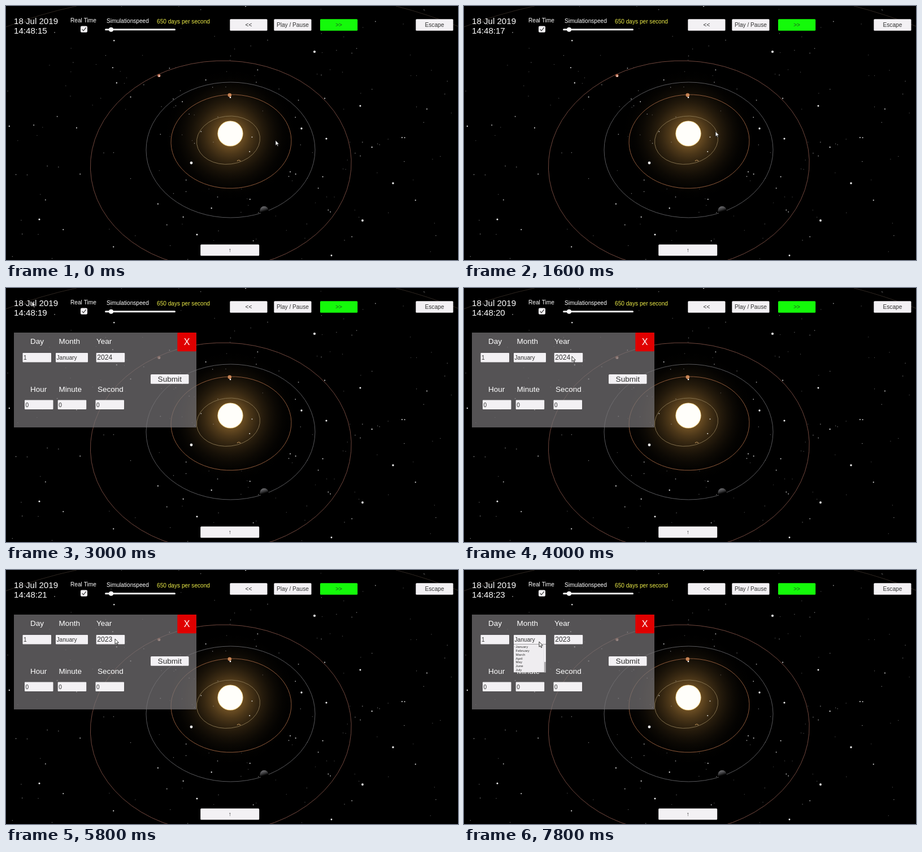
An HTML page with a canvas for the animation above (8000 ms loop, 800x450 px).

```html
<!DOCTYPE html>
<html lang="en">
<head>
<meta charset="utf-8">
<title>Solar system simulation</title>
<style>
  html, body { margin: 0; width: 100%; height: 100%; overflow: hidden; background: #000; }
  canvas { display: block; width: 100vw; height: 100vh; }
</style>
</head>
<body>
<canvas id="stage" width="800" height="450"></canvas>
<script>
const ctx = document.getElementById('stage').getContext('2d');
const LOOP = 8000, STEP = 200, TAU = Math.PI * 2;
const LIGHT = '#f3f1f4', DARK = '#323232';

const PANEL_OPENS = 3000, YEAR_CHANGES = 5000, MONTHS_OPEN = 7600;
const POINTER_START = { x: 477, y: 238 };
const POINTER_MOVES = [
  { from: 1400, to: 2600, x: 46, y: 24 },
  { from: 3000, to: 3800, x: 191, y: 121 },
  { from: 5000, to: 5400, x: 193, y: 122 },
  { from: 6200, to: 7200, x: 133, y: 127 }
];
const BRIGHT_STARS = [
  [328, 278], [546, 81], [631, 380], [685, 314], [523, 217],
  [567, 235], [59, 378], [338, 405], [627, 177], [576, 442]
];

function disc(x, y, r, fill) {
  ctx.fillStyle = fill;
  ctx.beginPath();
  ctx.arc(x, y, r, 0, TAU);
  ctx.fill();
}

function box(x, y, w, h, fill = LIGHT, radius = 1) {
  ctx.fillStyle = fill;
  ctx.beginPath();
  ctx.roundRect(x, y, w, h, radius);
  ctx.fill();
}

function text(value, x, y, size = 10.15, fill = '#fff', align = 'left') {
  ctx.font = `${size}px "Liberation Sans", Arial, sans-serif`;
  ctx.textAlign = align;
  ctx.fillStyle = fill;
  ctx.fillText(value, x, y);
}

function button(label, x, y, w, h, fill = LIGHT, color = DARK, size = 10.15) {
  box(x, y, w, h, fill, 1.5);
  text(label, x + w / 2, y + h / 2 + size * 0.35, size, color, 'center');
}

function field(value, x, y, w, size = 10.15) {
  box(x, y, w, 16.5);
  text(value, x + 1.5, y + 12.3, size, DARK);
}

function stroke(path, color, width) {
  ctx.strokeStyle = color;
  ctx.lineWidth = width;
  ctx.stroke(new Path2D(path));
}

function orbit(x, y, rx, ry, tilt, color) {
  ctx.strokeStyle = color;
  ctx.lineWidth = 0.9;
  ctx.beginPath();
  ctx.ellipse(x, y, rx, ry, tilt, 0, TAU);
  ctx.stroke();
}

function drawStars() {
  let seed = 71;
  const random = () => (seed = (seed * 16807) % 2147483647) / 2147483647;
  for (let i = 0; i < 200; i++) {
    const size = random() ** 3;
    disc(random() * 800, random() * 450, 0.6 + size * 0.6, `rgba(255,255,255,${0.35 + size * 0.55})`);
  }
  BRIGHT_STARS.forEach(([x, y], i) => disc(x, y, 1.4 + Math.exp(-i / 3), '#f0f0f0'));
}

function drawGlow() {
  const glow = ctx.createRadialGradient(397, 228, 0, 397, 228, 116);
  for (let s = 0; s <= 10; s++) {
    glow.addColorStop(s / 10, `rgba(166,120,54,${(1 - s / 10) ** 2.2})`);
  }
  disc(397, 228, 116, glow);
}

function drawPlanets() {
  stroke('M409 275Q412 271 415 275', '#b28b56', 1.2);
  disc(395.8, 157.7, 3.3, '#c98454');
  disc(397, 162, 1.3, '#fff');

  const shade = ctx.createLinearGradient(455, 354, 459, 367);
  shade.addColorStop(0, '#77777a');
  shade.addColorStop(0.45, '#3c3c3e');
  shade.addColorStop(0.75, '#000');
  disc(457, 362.5, 7.7, shade);

  disc(270.8, 123.2, 2.7, '#b9694e');
  disc(271.3, 124.2, 1.4, '#f0d9ce');
}

function drawSpace() {
  ctx.fillStyle = '#000';
  ctx.fillRect(0, 0, 800, 450);
  drawGlow();
  drawStars();

  orbit(393.5, 237.7, 56.2, 42.5, -0.12, '#8a7652');
  orbit(398.5, 240, 106.5, 83, -0.03, '#9c6240');
  orbit(397.5, 255, 149.5, 120, 0, '#626266');
  orbit(380.3, 281, 231, 184, -0.04, '#7d5044');
  stroke('M0 37Q60 14 125 0M690 0Q748 15 800 36', '#3a3029', 0.8);

  disc(397, 226, 22.6, '#ffdf94');
  disc(397, 226, 21.7, '#fffefa');
  drawPlanets();
}

function drawToolbar(t) {
  const seconds = t < STEP ? 15 : 16 + Math.floor(t / 1000);
  text('18 Jul 2019', 14, 32, 15.1);
  text('14:48:' + seconds, 14, 49.3, 15.1);

  text('Real Time', 114, 29);
  box(132, 35.5, 12, 11.2, LIGHT, 2);
  stroke('M134.5 41L137 43.8 141.8 38.2', DARK, 1.1);

  text('Simulationspeed', 178, 30);
  text('650 days per second', 267, 30.5, 10.15, '#eded48');
  box(175, 40.2, 125, 3, '#e8e8e8', 1.5);
  disc(186, 41.7, 4, '#fff');

  button('<<', 396.3, 23.3, 66.2, 20.4);
  button('Play / Pause', 474.3, 23.3, 66.2, 20.4);
  button('>>', 556, 23.3, 66.2, 20.4, '#14fa0a', '#205c20');
  button('Escape', 725.3, 23.3, 66.2, 20.4);
  button('↑', 344.2, 422.5, 104, 20);
}

function drawPanel(t) {
  box(14, 79, 323, 168, 'rgba(118,115,118,.72)', 0);
  button('X', 303.3, 79, 33.5, 33.3, '#e00000', '#fff', 16);

  text('Day', 43, 98.5, 13.5);
  text('Month', 93.5, 98.5, 13.5);
  text('Year', 160, 98.5, 13.5);
  field('1', 29.5, 115, 50.5);
  field('January', 88, 115, 57);
  field(t < YEAR_CHANGES ? '2024' : '2023', 159.7, 115, 50.5, 12.1);

  button('Submit', 256, 153, 67.5, 16.7, LIGHT, DARK, 13.6);

  text('Hour', 43, 184.3, 13.5);
  text('Minute', 93.5, 184.3, 13.5);
  text('Second', 162, 184.3, 13.5);
  for (const x of [33, 91.7, 158.5]) field('0', x, 198.5, 50.5);

  if (t >= MONTHS_OPEN) drawMonths();
}

function drawMonths() {
  box(88, 132, 57, 49.3, '#efedf0', 0);
  ['January', 'February', 'March', 'April', 'May', 'June', 'July']
    .forEach((month, i) => text(month, 91.5, 138.4 + i * 6.72, 6.1, DARK));
  stroke('M89 136H90.5', '#777', 0.7);
  box(141.8, 132, 3.2, 49.3, '#aaa8ab', 0);
  box(142, 132, 2.8, 31, '#f5f3f6', 1);
}

function drawPointer(t) {
  let { x, y } = POINTER_START;
  for (const move of POINTER_MOVES) {
    const part = Math.min(1, Math.max(0, (t - move.from) / (move.to - move.from)));
    const eased = part * part * (3 - 2 * part);
    x += (move.x - x) * eased;
    y += (move.y - y) * eased;
  }
  ctx.save();
  ctx.translate(x, y);
  const arrow = 'M0 0V9.2L2.1 7.3 3.6 10.6 5 10 3.6 6.8H6.4Z';
  ctx.fillStyle = '#fff';
  ctx.fill(new Path2D(arrow));
  stroke(arrow, '#222', 0.9);
  ctx.restore();
}

function render(now) {
  const t = Math.floor((now % LOOP) / STEP) * STEP;
  drawSpace();
  drawToolbar(t);
  if (t >= PANEL_OPENS) drawPanel(t);
  drawPointer(t);
  requestAnimationFrame(render);
}
requestAnimationFrame(render);
</script>
</body>
</html>
```
